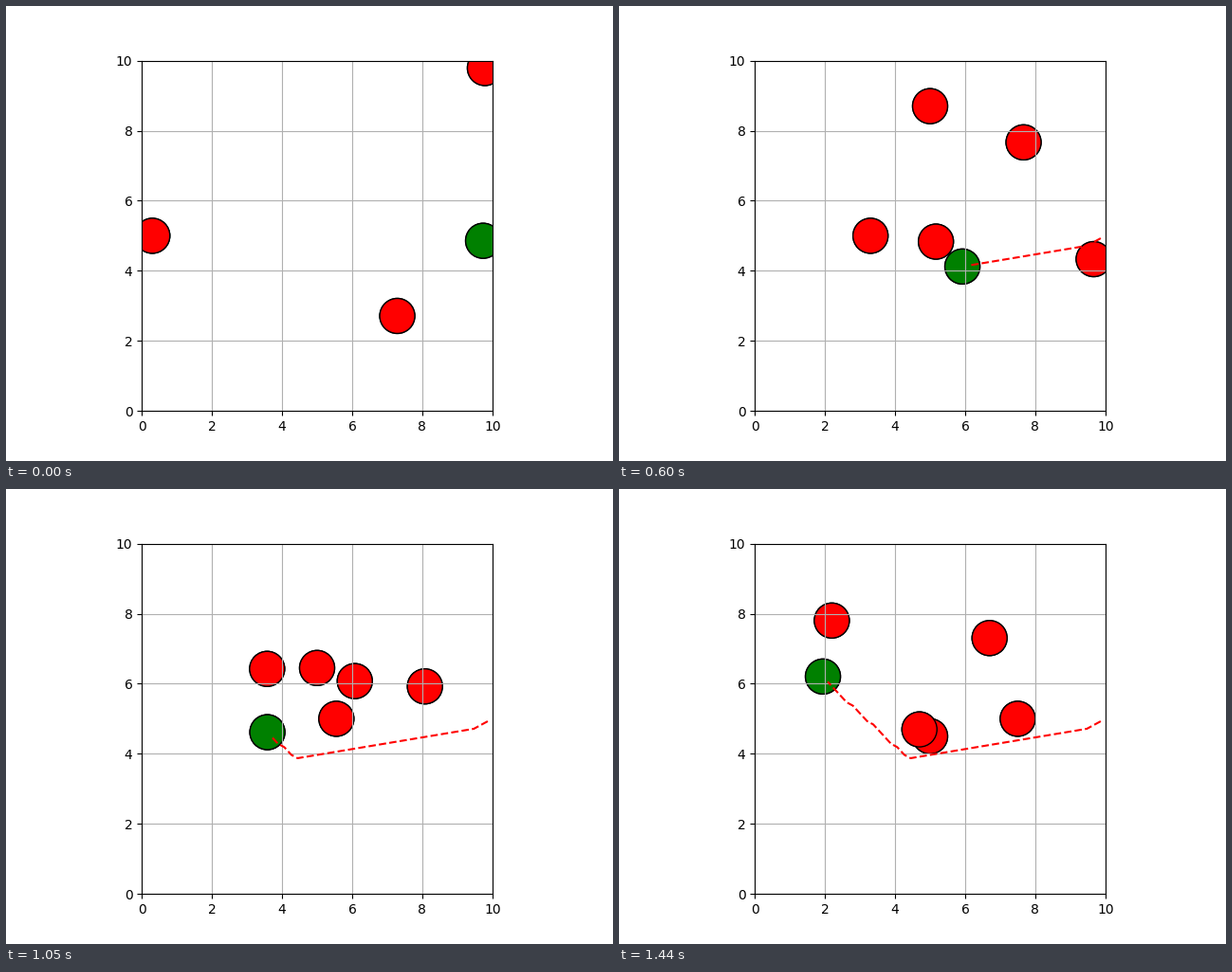
A matplotlib script that plays this animation: 640x480 px, repeating every 1.47 s.

```python
import numpy as np
import matplotlib.pyplot as plt
from matplotlib.animation import FuncAnimation
from matplotlib.patches import Circle

FRAMES = 49
INTERVAL = 30
DT = 0.1
RADIUS = 0.5
CLEARANCE = 2.2 * RADIUS
MAX_SPEED = 2
START = np.array([10.0, 5.0])
GOAL = np.array([0.0, 8.0])

# Obstacles share one speed and differ in start point and heading
OBSTACLE_SPEED = 1.5
STARTS = np.array([(5, 12), (0, 5), (10, 10), (7.5, 2.5), (12, 2)])
HEADINGS = np.radians([-90, 0, -135, 135, 135])


def direction(angle):
    return np.stack([np.cos(angle), np.sin(angle)], axis=-1)


def cross(a, b):
    return a[..., 0] * b[..., 1] - a[..., 1] * b[..., 0]


VELOCITIES = OBSTACLE_SPEED * direction(HEADINGS)

# Velocities the robot may choose from: 20 headings, 5 speeds
angles, speeds = np.meshgrid(np.linspace(0, 2 * np.pi, 20),
                             np.linspace(0, MAX_SPEED, 5), indexing="ij")
CHOICES = speeds.reshape(-1, 1) * direction(angles.ravel())


def obstacles_at(step):
    return STARTS + VELOCITIES * DT * (step + 1)


def choose_velocity(pos, centers):
    """Pick the collision-free velocity closest to the one toward the goal."""
    wanted = MAX_SPEED * (GOAL - pos) / np.linalg.norm(GOAL - pos)
    free = np.full(len(CHOICES), True)
    for center, velocity in zip(centers, VELOCITIES):
        away = pos - center
        theta = np.arctan2(away[1], away[0])
        spread = np.arcsin(min(1, CLEARANCE / np.linalg.norm(away)))
        relative = CHOICES - velocity
        free &= ~((cross(direction(theta + spread), relative) > 0)
                  & (cross(direction(theta - spread), relative) < 0))
    options = CHOICES[free]
    return options[np.argmin(np.linalg.norm(options - wanted, axis=1))]


def drive(steps):
    path, pos = [], START
    for step in range(steps):
        pos = pos + DT * choose_velocity(pos, obstacles_at(step))
        path.append(pos)
    return np.array(path)


path = drive(FRAMES + 1)

fig, ax = plt.subplots(figsize=(6.4, 4.8), dpi=100)
ax.set_aspect("equal")
ax.set(xlim=(0, 10), ylim=(0, 10))
ax.grid(True)

trail, = ax.plot([], [], "r--", lw=1.5)
colors = ["green"] + ["red"] * len(STARTS)
discs = [Circle((0, 0), RADIUS, fc=color, ec="black") for color in colors]
# Two passes give the outlines a crisper edge
for disc in discs * 2:
    ax.add_patch(disc)


def update(frame):
    step = frame + 1
    for disc, center in zip(discs, [path[step], *obstacles_at(step)]):
        disc.center = tuple(center)
    trail.set_data(*path[:step].T)
    return [*discs, trail]


anim = FuncAnimation(fig, update, frames=FRAMES, interval=INTERVAL,
                     repeat=True, repeat_delay=0, blit=False)
plt.show()
```
